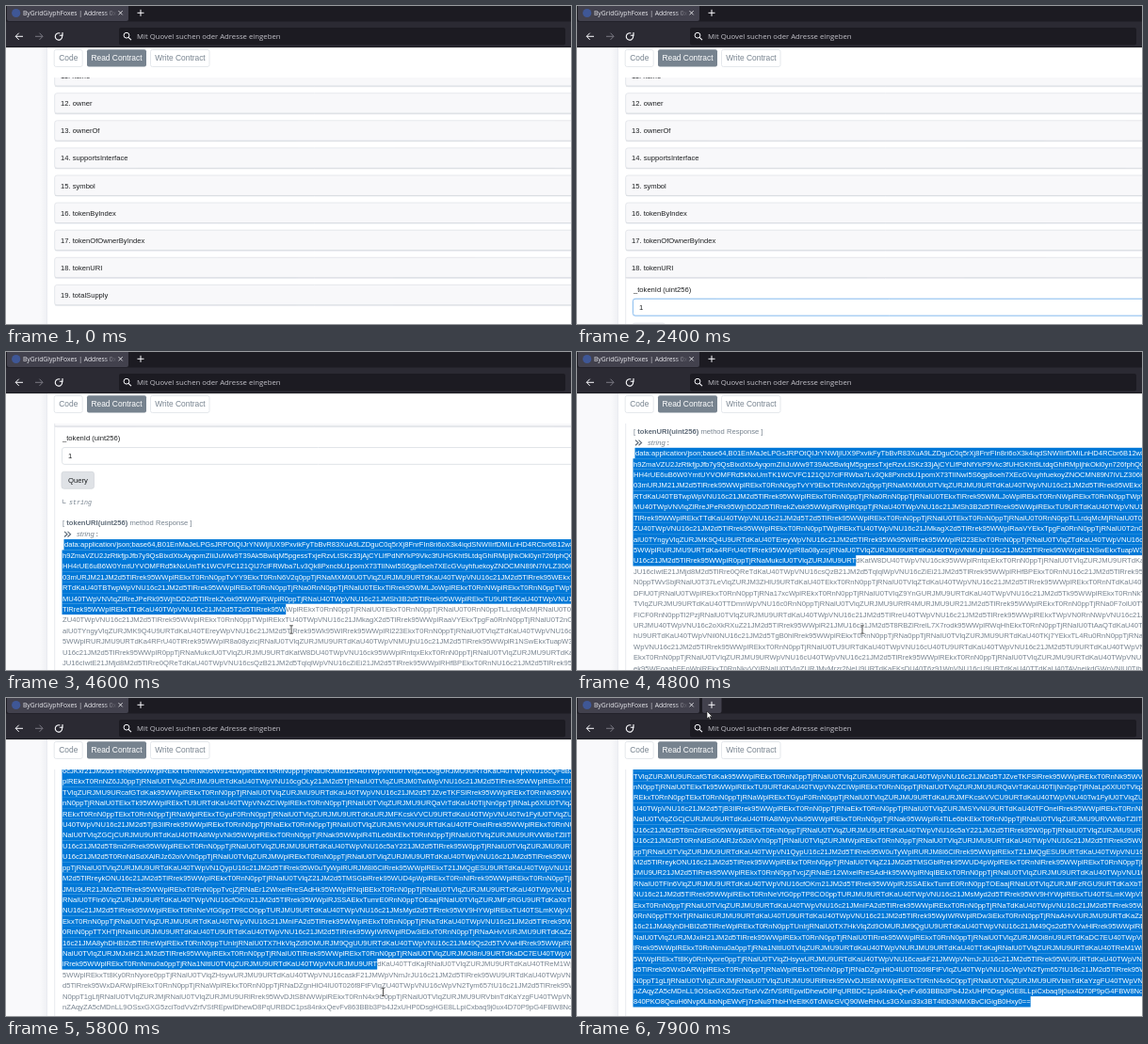
These frames come from a looping animation (600x338 px, 8 s). An HTML page with a canvas:

```html
<!DOCTYPE html>
<html lang="de">
<head>
<meta charset="utf-8">
<title>Read Contract</title>
<style>
html, body { margin: 0; width: 100%; height: 100%; overflow: hidden; background: #fff; }
canvas { display: block; width: 600px; height: 338px; }
</style>
</head>
<body>
<canvas id="stage"></canvas>
<script>
const W = 600, H = 338, LOOP = 8000;
const canvas = document.getElementById('stage');
const ctx = canvas.getContext('2d');
const dpr = window.devicePixelRatio || 1;
canvas.width = W * dpr;
canvas.height = H * dpr;

const SANS = '"Liberation Sans", Arial, sans-serif';
const UI = '"Open Sans", "Noto Sans", sans-serif';
const MONO = '"Liberation Mono", monospace';
const BODY = `7.61px ${SANS}`;
const INK = '#1e2022', GREY = '#77838f', LINE = '#e1e4e9', BLUE = '#0078d7';

const PITCH = 11.42, ROWS = 61, ROW0 = 414.5, LEFT = 60, WRAP = 600, LAST_W = 424;
const LIST_STEP = 29.1, CARD_H = 21.5;
const LIST = ['name', 'owner', 'ownerOf', 'supportsInterface', 'symbol',
  'tokenByIndex', 'tokenOfOwnerByIndex', 'tokenURI', 'totalSupply'];

// Keyframes: [time, value, value...]
const SCROLL = [[2500, 0], [2900, 185.5], [4550, 185.5], [4650, 234], [4800, 307],
  [5150, 674], [5300, 674], [5900, 777]];
const POINTER = [[500, 215, 345], [900, 150, 279], [1200, 150, 279], [1700, 180, 320],
  [2500, 180, 300], [3100, 76, 161], [3300, 76, 161], [3600, 91, 238], [3900, 63, 229],
  [4100, 63, 229], [4550, 303, 295], [4800, 303, 295], [5300, 313, 302], [6300, 488, 323],
  [6800, 486, 323], [7600, 104, 8], [7900, 138, 14]];

function at(keys, t) {
  if (t <= keys[0][0]) return keys[0].slice(1);
  for (let i = 1; i < keys.length; i++) {
    const a = keys[i - 1], b = keys[i];
    if (t <= b[0]) {
      const k = (t - a[0]) / (b[0] - a[0]);
      return a.slice(1).map((v, j) => v + (b[j + 1] - v) * k);
    }
  }
  return keys[keys.length - 1].slice(1);
}

function text(s, x, y, color = INK, font = BODY) {
  ctx.font = font;
  ctx.fillStyle = color;
  ctx.fillText(s, x, y);
  return x + ctx.measureText(s).width;
}

function rect(x, y, w, h, color) {
  ctx.fillStyle = color;
  ctx.fillRect(x, y, w, h);
}

function box(x, y, w, h, r, fill, stroke, lw = 0.8) {
  ctx.beginPath();
  ctx.roundRect(x, y, w, h, r);
  if (fill) { ctx.fillStyle = fill; ctx.fill(); }
  if (stroke) { ctx.strokeStyle = stroke; ctx.lineWidth = lw; ctx.stroke(); }
}

function path(points, color, lw = 1) {
  ctx.beginPath();
  points.forEach(([x, y], i) => i ? ctx.lineTo(x, y) : ctx.moveTo(x, y));
  ctx.strokeStyle = color;
  ctx.lineWidth = lw;
  ctx.stroke();
}

// Response text: seeded random letters with recurring syllables, wrapped by width
function makeRows() {
  let seed = 7;
  const rnd = n => {
    seed = (seed * 1103515 + 12345) % 2147483648;
    return Math.floor(seed / 65536) % n;
  };
  const syllables = ['VlqZ', 'URJM', 'U9UR', 'TdKa', 'U40T', 'WpVN', 'U16c', '21JM', '2d5T',
    'lRre', 'k95W', 'WplR', 'EkxT', '0RnN', '0ppT', 'jRNa', 'lU0T'];
  const upper = 'ABCDEFGHIJKLMNOPQRSTUVWXYZ';
  const letters = upper + upper.toLowerCase() + '0123456789';
  const noise = n => Array.from({ length: n }, () => letters[rnd(letters.length)]).join('');

  ctx.font = BODY;
  const widths = {};
  const list = [];
  let row = '', used = 2, step = 0;
  const push = s => {
    for (const ch of s) {
      const w = widths[ch] ??= ctx.measureText(ch).width;
      if (used + w > WRAP) {
        list.push(row);
        row = '';
        used = 0;
      }
      row += ch;
      used += w;
    }
  };
  push(['data', 'application/json;base' + 64 + ','].join(':'));
  while (list.length < ROWS) {
    const plain = list.length < 3 || list.length > ROWS - 3;
    if (rnd(9) === 0) step += rnd(syllables.length);
    push(plain || rnd(7) === 0 ? noise(4) : syllables[step++ % syllables.length]);
  }
  let last = list[ROWS - 1];
  while (ctx.measureText(last + '==').width > LAST_W) last = last.slice(0, -1);
  list[ROWS - 1] = last + '==';
  return list.slice(0, ROWS);
}
const rows = makeRows();
const rowX = i => i ? LEFT : LEFT + 2;

function selectionEnd(t) {
  if (t < 4150) return null;
  if (t >= 6300) return { row: ROWS - 1, x: 1e4 };
  const [x, y] = at(POINTER, t);
  const [s] = at(SCROLL, t - 150);
  const row = Math.round((y + s - ROW0) / PITCH);
  return { row: Math.min(ROWS - 1, Math.max(0, row)), x: x - 3 };
}

function drawResponse(t, scroll) {
  let x = text('[ ', LEFT, 394.2, GREY);
  x = text('tokenURI(uint256)', x, 394.2, '#5f6b78', `bold 7.61px ${SANS}`);
  text(' method Response ]', x, 394.2, GREY);
  for (const cx of [62, 65.5]) path([[cx, 400.6], [cx + 3, 403.4], [cx, 406.2]], '#5f6b78', 1.2);
  x = text('string', 75, 405.8, GREY, `italic 7.61px ${SANS}`);
  text(' :', x, 405.8, INK);

  const end = selectionEnd(t);
  rows.forEach((row, i) => {
    const y = ROW0 + i * PITCH;
    if (y - scroll < 60 || y - scroll > H + 10) return;
    const x0 = rowX(i), base = y + 2.7;
    text(row, x0, base, GREY);
    if (!end || i > end.row) return;
    let n = row.length;
    ctx.font = BODY;
    if (i === end.row) {
      while (n && x0 + ctx.measureText(row.slice(0, n)).width > end.x) n--;
    }
    const part = row.slice(0, n);
    rect(x0 - 0.5, y - PITCH / 2, ctx.measureText(part).width + 0.5, PITCH + 0.1, BLUE);
    text(part, x0, base, '#fff');
  });
}

function drawForm(t, scroll) {
  text('_tokenId (uint256)', LEFT, 303.8);
  const focus = t >= 1700 && t < 3200;
  if (focus) box(58.6, 310.4, 620, 19.6, 3, '#d9eafb');
  box(59.5, 311.3, 620, 17.8, 2.5, '#fff', focus ? '#7db5ec' : '#d9dde3');
  if (t >= 2100) text('1', 66, 322.9);
  const hover = t >= 3000;
  box(59, 337, 34.5, 18, 2.5, hover ? '#dfe2e6' : '#f0f1f3', hover ? '#d3d7dc' : '#e6e8ec');
  text('Query', 66, 348.6, INK, `7.7px ${SANS}`);
  path([[60.3, 366.5], [60.3, 370.3], [63.5, 370.3]], GREY, 0.7);
  text('string', 67, 371.5, GREY, `italic 6.7px ${MONO}`);
  if (t >= 3400) drawResponse(t, scroll);
}

function drawCard(label, mid, open) {
  const top = mid - 10.8;
  box(51.7, top + 0.7, 640, CARD_H, 2.5, null, '#eceef1');
  box(51.7, top, 640, CARD_H, open ? [2.5, 2.5, 0, 0] : 2.5, '#f8f8fa', LINE);
  path([[52, top + CARD_H], [W, top + CARD_H]], '#d9dce1', 0.8);
  text(label, 58, mid + 2.7);
}

function drawPage(t) {
  const [scroll] = at(SCROLL, t);
  rect(0, 44, W, H - 44, '#fff');
  rect(0, 44, 43, H - 44, '#f9f9fb');
  const g = ctx.createLinearGradient(36, 0, 43.5, 0);
  g.addColorStop(0, '#f9f9fb');
  g.addColorStop(1, '#eff0f4');
  rect(36, 44, 7.5, H - 44, g);
  rect(43, 44, 0.7, H - 44, '#e4e6ec');

  ctx.save();
  ctx.beginPath();
  ctx.rect(44, 76, W, H);
  ctx.clip();
  ctx.translate(0, -scroll);
  const k = Math.min(1, Math.max(0, (t - 1000) / 350));
  const full = t >= 3400 ? ROW0 + ROWS * PITCH + 30 - 289 : 96;
  const bodyH = full * k * k * (3 - 2 * k);
  LIST.forEach((name, i) => {
    const mid = 74.4 + i * LIST_STEP + (i === 8 ? bodyH : 0);
    drawCard(`${i + 11}. ${name}`, mid, i === 7 && bodyH > 0);
  });
  if (bodyH > 0) {
    path([[51.7, 288], [51.7, 289 + bodyH], [W, 289 + bodyH]], LINE, 0.8);
    ctx.beginPath();
    ctx.rect(52, 289, W, bodyH);
    ctx.clip();
    drawForm(t, scroll);
  }
  ctx.restore();

  const tab = `8.38px ${SANS}`;
  box(51.2, 46.5, 30, 18, 2, '#fff', '#dfe2e7');
  text('Code', 56.3, 58.4, GREY, tab);
  box(86, 46.2, 63, 18.4, 2, '#77838f');
  text('Read Contract', 90.5, 58.4, '#fff', tab);
  box(153.5, 46.5, 62.5, 18, 2, '#fff', '#dfe2e7');
  text('Write Contract', 158.3, 58.4, GREY, tab);
}

function drawChrome(t) {
  const pale = '#fbfbfe';
  rect(0, 0, W, 17, '#1c1b22');
  rect(0, 16.5, W, 27.5, '#2b2a33');
  rect(0, 43.4, W, 0.7, '#15141a');
  box(1, -3, 129, 19, 2, '#42414d');
  ctx.beginPath();
  ctx.arc(10.7, 7.5, 4.6, 0, 7);
  ctx.fillStyle = '#3f5796';
  ctx.fill();

  const fade = ctx.createLinearGradient(104, 0, 118, 0);
  fade.addColorStop(0, '#e9e9ee');
  fade.addColorStop(1, 'rgba(233,233,238,0)');
  text('ByGridGlyphFoxes | Address 0x0', 18, 10, fade, `6.75px ${UI}`);
  path([[119.5, 5.2], [123.7, 9.4]], pale, 0.8);
  path([[123.7, 5.2], [119.5, 9.4]], pale, 0.8);

  if (t >= 7800) box(133, -2, 20.5, 18, 2, '#42414d');
  path([[139.5, 7.3], [146.5, 7.3]], pale);
  path([[143, 3.8], [143, 10.8]], pale);

  path([[18, 32.3], [10.2, 32.3]], pale);
  path([[13.7, 28.7], [10.2, 32.3], [13.7, 35.9]], pale);
  path([[31, 32.3], [39, 32.3]], '#7a7983');
  path([[35.5, 28.7], [39, 32.3], [35.5, 35.9]], '#7a7983');
  ctx.beginPath();
  ctx.arc(56, 32.4, 3.7, -0.5, 5.1);
  ctx.strokeStyle = pale;
  ctx.lineWidth = 1.1;
  ctx.stroke();
  path([[60, 28], [60, 31.2], [56.8, 31.2]], pale, 1.1);

  box(120, 23, 474, 18.6, 2, '#1c1b22');
  ctx.beginPath();
  ctx.arc(128, 31.2, 2.9, 0, 7);
  ctx.strokeStyle = pale;
  ctx.lineWidth = 1;
  ctx.stroke();
  path([[130.1, 33.3], [133, 36.2]], pale, 1.1);
  text('Mit Quovel suchen oder Adresse eingeben', 139, 35.4, '#c3c2c9', `7.75px ${UI}`);
}

function drawPointer(t) {
  const hidden = t < 500 || (t >= 2100 && t < 2500) || (t >= 6300 && t < 6800);
  if (hidden) return;
  const [x, y] = at(POINTER, t);
  const beam = (t >= 1600 && t < 2100) || (t >= 3500 && t < 7000);
  if (beam) {
    for (const [color, lw] of [['#fff', 1.6], ['#222', 0.8]]) {
      path([[x, y - 4], [x, y + 4]], color, lw);
      path([[x - 1.8, y - 4.2], [x + 1.8, y - 4.2]], color, lw);
      path([[x - 1.8, y + 4.2], [x + 1.8, y + 4.2]], color, lw);
    }
    return;
  }
  const shape = [[0, 0], [0, 8], [1.9, 6.3], [3.1, 9], [4.3, 8.5], [3.1, 5.8], [5.7, 5.7]];
  ctx.beginPath();
  shape.forEach(([dx, dy]) => ctx.lineTo(x + dx, y + dy));
  ctx.closePath();
  ctx.fillStyle = '#fff';
  ctx.fill();
  ctx.strokeStyle = '#111';
  ctx.lineWidth = 0.6;
  ctx.stroke();
}

const start = performance.now();
function frame(now) {
  const t = Math.floor(Math.max(0, now - start) % LOOP / 100) * 100;
  ctx.setTransform(dpr, 0, 0, dpr, 0, 0);
  drawPage(t);
  drawChrome(t);
  drawPointer(t);
  requestAnimationFrame(frame);
}
requestAnimationFrame(frame);
</script>
</body>
</html>
```
